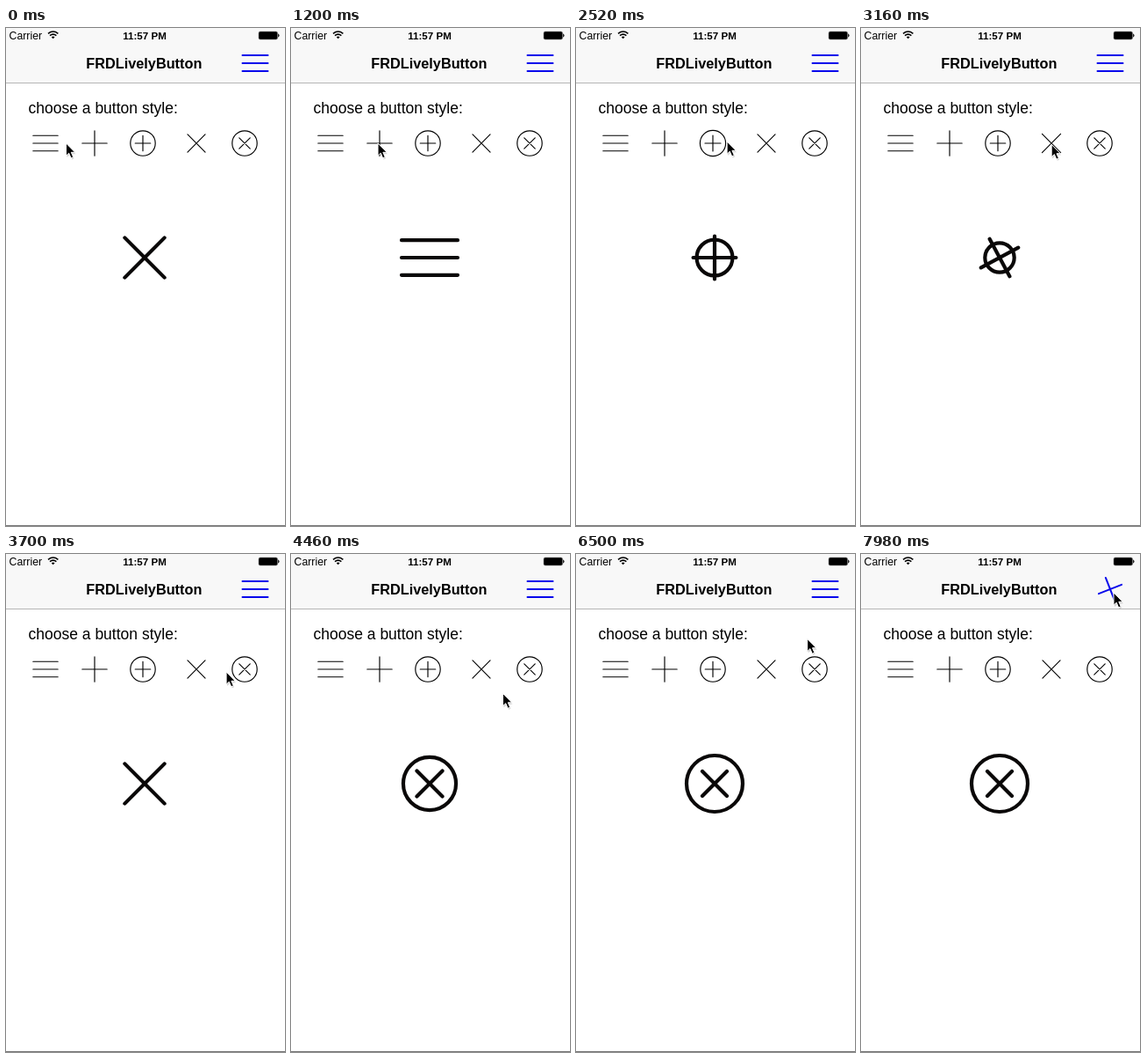
An HTML page that plays this animation: 318x566 px, repeating every 8000 ms.

```html
<!DOCTYPE html>
<html lang="en">
<head>
<meta charset="utf-8">
<title>Button styles</title>
<style>
  html, body { margin: 0; width: 100%; height: 100%; overflow: hidden; background: #fff; }
  svg { display: block; width: 318px; height: 566px; font-family: "Liberation Sans", Arial, sans-serif; }
  .button { fill: none; stroke-linecap: round; }
</style>
</head>
<body>
<svg id="stage" viewBox="0 0 318 566">
  <rect width="318" height="566" fill="#fff"/>
  <rect width="318" height="62" fill="#f8f8f8"/>
  <rect y="62" width="318" height="1" fill="#b5b5b5"/>
  <rect y="565" width="318" height="1" fill="#777"/>

  <text x="3.5" y="12.5" font-size="12.3">Carrier</text>
  <g fill="none" stroke="#000" stroke-width="1.6">
    <path d="M48 6.3Q53.7 1.8 59.4 6.3M50 8.6Q53.7 5.6 57.4 8.6"/>
    <path d="M51.8 10.2Q53.7 8.6 55.6 10.2L53.7 12.2Z" fill="#000" stroke="none"/>
  </g>
  <text x="158" y="12.5" font-size="11.6" font-weight="bold" text-anchor="middle">11:57 PM</text>
  <rect x="288" y="4" width="21.5" height="9" rx="1.8" fill="#000" stroke="#777" stroke-width=".6"/>
  <path d="M310.5 6.8q1.5 1.7 0 3.4z" fill="#000" stroke="#000" stroke-width=".6"/>

  <text x="157.3" y="46" font-size="16.3" font-weight="bold" text-anchor="middle">FRDLivelyButton</text>
  <text x="25.5" y="97" font-size="17.5">choose a button style:</text>

  <g id="buttons"></g>
  <g id="cursor">
    <path d="M1 2V16L4.3 13L6.6 18.4L9 17.3L6.8 12.2H11Z" fill="#000" opacity=".16"/>
    <path d="M0 0V14.2L3.2 11.2L5.6 16.8L8.2 15.7L5.8 10.3H10.2Z" fill="#000" stroke="#fff" stroke-width="1" stroke-linejoin="round"/>
  </g>
</svg>
<script>
const LOOP = 8000, MORPH = 300, GOLDEN = 1.618, Q = Math.PI / 4;
const NS = "http://www.w3.org/2000/svg";
const clamp = v => Math.max(0, Math.min(1, v));
const mix = (a, b, p) => a + (b - a) * p;

// Endpoints on a unit radius
const line = (angle, r, dy = 0) => {
  const x = r * Math.cos(angle), y = r * Math.sin(angle);
  return [-x, dy - y, x, dy + y];
};
// Three lines followed by the ring radius
const cross = (angle, r, ring) =>
  [...line(angle, r), ...line(angle - 2 * Q, r), ...line(angle - 2 * Q, r), ring];

const styles = {
  hamburger: [...line(0, 1), ...line(0, 1, -1 / GOLDEN), ...line(0, 1, 1 / GOLDEN), 0.05],
  close: cross(Q, 1, 0.05),
  plus: cross(2 * Q, 1, 0.05),
  circlePlus: cross(2 * Q, 1 / GOLDEN, 1),
  circleClose: cross(Q, 1 / GOLDEN, 1)
};

const icon = (x, style, press) =>
  ({ x, y: 131, r: 14.2, width: 1.15, rgb: [0, 0, 0], style, morphs: [], presses: [press] });

const buttons = [
  icon(45, "hamburger", [340, 460]),
  icon(101, "plus", [1390, 1510]),
  icon(156, "circlePlus", [2200, 2320]),
  icon(217, "close", [2890, 3000]),
  icon(272, "circleClose", [4060, 4170]),
  { x: 158, y: 261, r: 32, width: 4.2, rgb: [10, 8, 8], style: "close",
    morphs: [[460, "hamburger"], [1520, "plus"], [2335, "circlePlus"], [3010, "close"], [4180, "circleClose"]],
    presses: [[5010, 5830]] },
  { x: 284, y: 40, r: 14.5, width: 2, rgb: [8, 8, 235], style: "hamburger",
    morphs: [[7100, "close"], [7825, "plus"]],
    presses: [[6990, 7100], [7690, 7815]] }
];

const layer = document.getElementById("buttons");
for (const b of buttons) {
  const add = tag => b.group.appendChild(document.createElementNS(NS, tag));
  b.group = layer.appendChild(document.createElementNS(NS, "g"));
  b.group.setAttribute("class", "button");
  b.group.setAttribute("stroke-width", b.width);
  b.path = add("path");
  b.ring = add("circle");
}

function shapeAt(b, t) {
  let shape = styles[b.style];
  for (const [start, name] of b.morphs) {
    const p = clamp((t - start) / MORPH);
    shape = shape.map((v, i) => mix(v, styles[name][i], p));
  }
  return shape;
}

// Shrinks and greys while held, overshoots on release
function pressAt(b, t) {
  let scale = 1, grey = 0;
  for (const [down, up] of b.presses) {
    if (t < down || t > up + 250) continue;
    if (t < up) {
      grey = clamp((t - down) / 100);
      scale = 1 - 0.1 * grey;
    } else {
      const u = t - up;
      grey = 1 - clamp(u / 150);
      scale = u < 130 ? mix(0.9, 1.07, u / 130) : mix(1.07, 1, (u - 130) / 120);
    }
  }
  return { scale, grey };
}

function drawButton(b, t) {
  const shape = shapeAt(b, t), { scale, grey } = pressAt(b, t);
  const pts = shape.map(v => (v * b.r * scale).toFixed(2));
  let d = "";
  for (let i = 0; i < 12; i += 4) d += `M${pts[i]} ${pts[i + 1]}L${pts[i + 2]} ${pts[i + 3]}`;
  b.path.setAttribute("d", d);
  b.ring.setAttribute("r", pts[12]);
  b.ring.setAttribute("opacity", clamp((shape[12] - 0.05) * 4));
  b.group.setAttribute("transform", `translate(${b.x} ${b.y})`);
  b.group.setAttribute("stroke", `rgb(${b.rgb.map(c => Math.round(mix(c, 132, grey)))})`);
}

// Time, x, y of the pointer tip
const track = [
  [0, 68.5, 131], [60, 68.5, 131], [300, 54, 131], [520, 54, 131], [880, 71, 131],
  [1200, 99, 131], [1520, 102, 131], [1690, 113, 131], [2080, 158, 130], [2340, 160, 129],
  [2520, 172, 129], [2840, 214, 131], [3060, 216, 132], [3340, 222, 133], [3700, 251, 134],
  [3980, 270, 133], [4240, 270, 133], [4900, 161, 262], [5030, 161, 264], [5240, 163.5, 305.5],
  [5780, 160, 406], [5880, 160, 424], [6000, 165, 420], [6500, 263.5, 97], [6560, 264, 93],
  [6620, 264, 93], [6920, 288, 45], [7400, 289, 44], [7980, 288, 44], [8000, 288, 44]
];

function slope(i, k) {
  const a = track[i - 1], b = track[i], c = track[i + 1];
  if (!a || !c || (b[k] - a[k]) * (c[k] - b[k]) <= 0) return 0;
  return (c[k] - a[k]) / (c[0] - a[0]);
}

function pointerAt(t, k) {
  const i = track.findIndex((p, n) => n < track.length - 1 && t < track[n + 1][0]);
  const a = track[i], b = track[i + 1], h = b[0] - a[0], u = (t - a[0]) / h;
  const s = u * u * (3 - 2 * u);
  return mix(a[k], b[k], s)
    + h * slope(i, k) * u * (1 - u) ** 2
    - h * slope(i + 1, k) * u * u * (1 - u);
}

const cursor = document.getElementById("cursor");
const start = performance.now();

function render(now) {
  const t = Math.max(0, now - start) % LOOP;
  for (const b of buttons) drawButton(b, t);
  cursor.setAttribute("transform", `translate(${pointerAt(t, 1).toFixed(2)} ${pointerAt(t, 2).toFixed(2)})`);
  requestAnimationFrame(render);
}
render(start);
</script>
</body>
</html>
```
